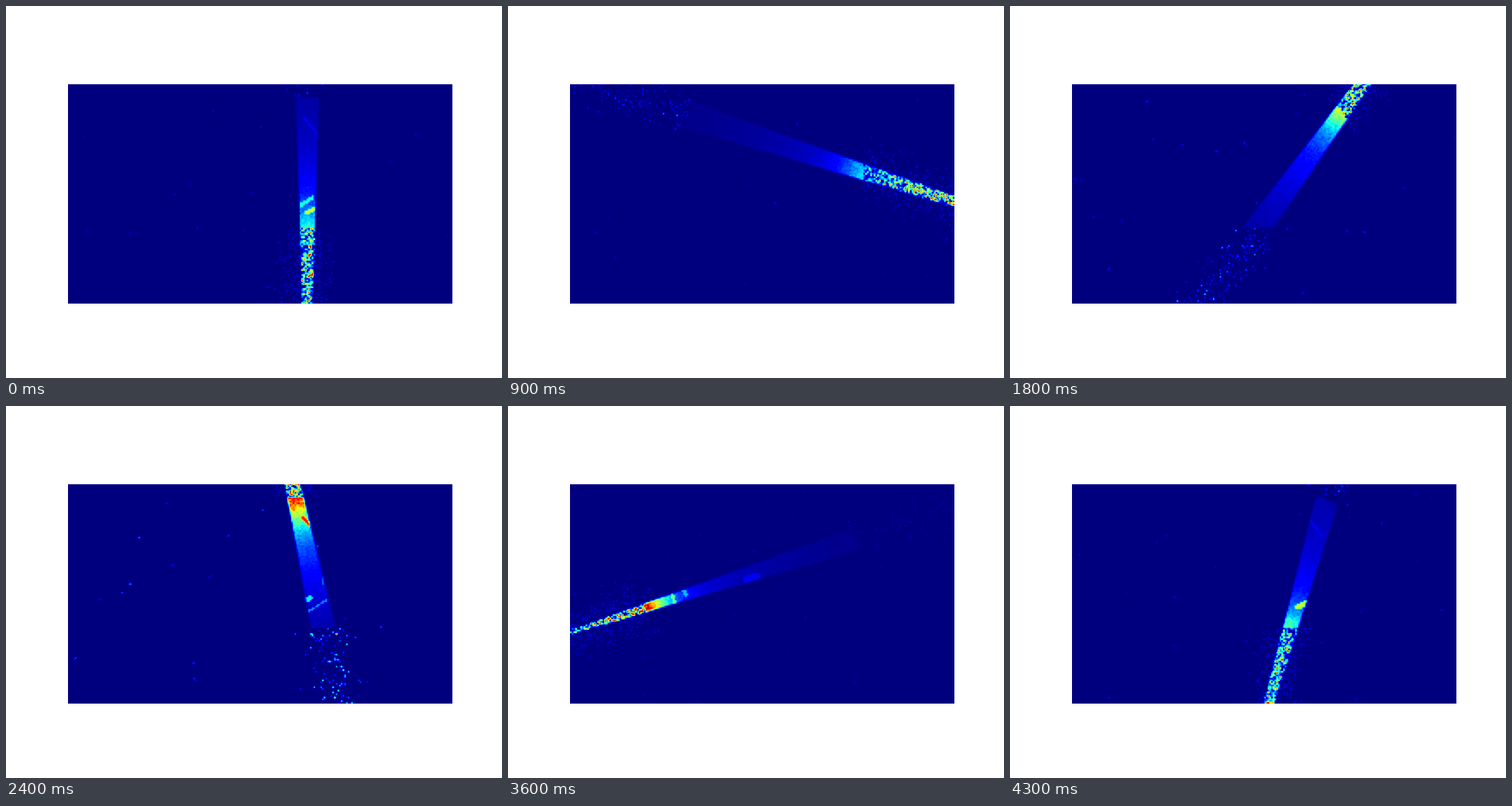
A matplotlib script that plays this animation: 640x480 px, repeating every 4.4 s.

```python
import numpy as np
import matplotlib.pyplot as plt
from matplotlib.animation import FuncAnimation
from matplotlib.path import Path

FRAMES, STEP = 44, 8            # degrees of source rotation per frame
ROWS, COLS = 128, 224
CELL = 496 / COLS
PIVOT = (389, 192)              # every beam passes through this point

# cell centres in stage pixels
X, Y = np.meshgrid(80 + (np.arange(COLS) + 0.5) * CELL,
                   100.7 + (np.arange(ROWS) + 0.5) * CELL)

BODY = Path([(235, 118), (402, 118), (425, 131), (446, 165), (460, 187),
             (457, 257), (443, 274), (432, 286), (178, 286), (178, 250),
             (235, 139)])
INSIDE = BODY.contains_points(np.c_[X.ravel(), Y.ravel()]).reshape(X.shape)

# angle, rim light, body light, falloff, speckle at rim, speckle at edge,
# far speckle, stray dots
LIGHT = np.array([
    (0, .20, .19, 95, .40, .42, .10, .07),
    (40, .25, .10, 100, .28, .72, .12, .09),
    (104, .20, .12, 110, .28, .52, .02, .07),
    (192, .40, .50, 70, .55, .55, .24, .22),
    (248, .35, .18, 80, .42, .68, .03, .06),
    (288, .76, .15, 110, .70, .42, .02, .05),
    (344, .24, .18, 115, .38, .50, .09, .09),
])

# x0, y0, x1, y1, radius, strength, angle at which the mark lights up
MARKS = [
    (378, 259, 395, 248, 2.6, .40, 3),
    (388, 267, 400, 261, 2.6, .64, 3),
    (371, 260, 381, 255, 3.2, .60, 342),
    (385, 145, 402, 167, 1.4, .14, 352),
    (421, 244, 433, 228, 2.4, .38, 40),
    (410, 226, 416, 210, 2.2, .17, 40),
    (415, 182, 418, 195, 2.2, .32, 104),
    (383, 145, 391, 153, 2.2, .88, 192),
    (387, 251, 393, 248, 3.2, .36, 192),
    (391, 265, 413, 251, 1.3, .27, 192),
    (409, 222, 410, 231, 1.3, .24, 192),
    (212, 244, 215, 254, 2.0, .52, 288),
    (227, 239, 230, 244, 2.4, .32, 288),
    (308, 225, 320, 220, 5.0, .10, 288),
    (308, 224, 324, 221, 5.0, .05, 104),
]


def light_at(angle):
    return [np.interp(angle, LIGHT[:, 0], col, period=360)
            for col in LIGHT.T[1:]]


def near_segment(x0, y0, x1, y1, radius):
    dx, dy = x1 - x0, y1 - y0
    t = np.clip(((X - x0) * dx + (Y - y0) * dy) / (dx * dx + dy * dy), 0, 1)
    return np.hypot(X - x0 - t * dx, Y - y0 - t * dy) < radius


SHAPES = [near_segment(*mark[:5]) for mark in MARKS]


def field(i):
    angle = STEP * i
    rim, body, fall, near, edge, far, stray = light_at(angle)
    rng = np.random.default_rng(100 + i)
    a = np.radians(angle)
    ux, uy = np.sin(a), np.cos(a)
    dx, dy = X - PIVOT[0], Y - PIVOT[1]
    along = dx * ux + dy * uy
    side = np.abs(dx * uy - dy * ux)

    half = np.maximum(12.5 - 0.032 * along, 2.8)
    beam = np.clip((half - side) / CELL + 0.5, 0, 1)
    core = side < 3
    border = along[core & INSIDE].max()
    end = along[core].max()
    depth = np.maximum(border - along, 0)

    # smooth light on the body
    glow = rim * np.exp(-(depth / 28) ** 1.5) + body * np.exp(-depth / fall)
    glow *= 1 + 0.08 * rng.standard_normal(X.shape)
    data = np.where(INSIDE, glow * beam, 0)
    for shape, mark in zip(SHAPES, MARKS):
        turn = (angle - mark[6] + 180) % 360 - 180
        level = mark[5] * np.exp(-(turn / 14) ** 2) * beam
        data = np.where(shape & INSIDE, np.maximum(data, level), data)

    # speckle off the body, on both sides of it
    part = np.clip((along - border) / max(end - border, 1), 0, 1)
    grain = rng.gamma(2.5, 0.4, X.shape) * (rng.random(X.shape) > 0.2)
    front = (near + (edge - near) * part) * grain * beam
    spread = np.exp(-(side / 24) ** 2)
    sparse = rng.random(X.shape)
    halo = 0.09 * rng.random(X.shape) * (sparse < 0.4 * spread)
    back = far * grain * (sparse < 0.22 * np.exp(-(side / 20) ** 2))
    noise = np.where(along > 0, np.maximum(front, halo), back)
    data = np.where(INSIDE, data, noise)

    # stray dots
    for _ in range(18):
        r, c = rng.integers(1, ROWS - 1), rng.integers(1, COLS - 1)
        level = stray * rng.uniform(0.4, 1.3)
        data[r, c] = max(data[r, c], level)
        if rng.random() < 0.5:
            r, c = r + rng.integers(-1, 2), c + rng.integers(-1, 2)
            data[r, c] = max(data[r, c], 0.5 * level)
    return np.clip(data, 0, 0.95)


fig, ax = plt.subplots(figsize=(6.4, 4.8), dpi=100)
ax.axis("off")
image = ax.imshow(field(0), cmap="jet", vmin=0, vmax=1)


def draw(i):
    image.set_data(field(i))
    return [image]


anim = FuncAnimation(fig, draw, frames=FRAMES, interval=100,
                     repeat=True, repeat_delay=0)
plt.show()
```
